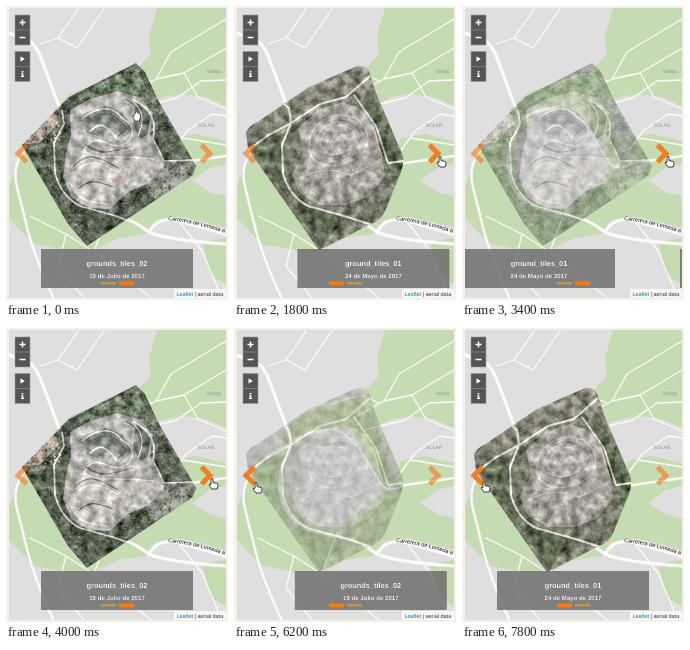
An HTML page for the animation above (8 s loop, 222 px wide and 294 px high).

```html
<!DOCTYPE html>
<html lang="es">
<head>
<meta charset="utf-8">
<title>Aerial map carousel</title>
<style>
html, body { margin: 0; width: 100%; height: 100%; overflow: hidden; background: #f4f2e8; }
svg { display: block; width: 100vw; height: 100vh; }
text { font-family: "Liberation Sans", Arial, sans-serif; text-rendering: geometricPrecision; }
.road { fill: none; stroke: #fbfbf9; stroke-linecap: round; stroke-linejoin: round; }
.place { font-size: 5px; fill: #969696; text-anchor: middle; }
.caption text { fill: #fff; font-weight: bold; text-anchor: middle; filter: drop-shadow(0 .5px .5px #0009); }
.caption rect { fill: #646464; fill-opacity: .78; }
.arrow { fill: none; stroke: #f47d20; stroke-width: 5; }
.button { fill: #555; stroke: #999; stroke-width: .6; }
.hand { fill: #fff; stroke: #111; stroke-width: .8; stroke-linejoin: round; }
</style>
</head>
<body>
<svg viewBox="0 0 222 294">
  <defs>
    <clipPath id="view"><rect x="3" y="2" width="217" height="290"/></clipPath>
    <clipPath id="julyEdge"><path d="M16 139 63 91 130 57 139 66 152 94 190 160 187 169 81 240 62 218Z"/></clipPath>
    <clipPath id="mayEdge"><path d="M12 127Q13 121 25 115L75 81 121 61Q132 57 136 68L142 87 166 143Q172 153 167 166L152 203Q148 214 137 218L85 244 77 233 14 143Z"/></clipPath>
    <path id="labelPath" d="M162 214Q192 217 225 229"/>
    <filter id="relief" x="0" y="0" width="1" height="1" color-interpolation-filters="sRGB">
      <feTurbulence type="fractalNoise" baseFrequency=".11" numOctaves="4" seed="5"/>
      <feColorMatrix values="1 0 0 0 0  1 0 0 0 0  1 0 0 0 0  0 0 0 0 1"/>
      <feComposite in="SourceGraphic" operator="arithmetic" k2="1" k3=".7" k4="-.35"/>
    </filter>
  </defs>
  <g clip-path="url(#view)">
    <rect width="222" height="294" fill="#dfdfdf"/>
    <g fill="#c5dbb2">
      <path d="M151 2H220V100L200 91 177 88 158 91 143 98 151 124 160 154 148 165 136 134 119 106 103 99 85 103 62 116 50 128 48 103 66 87 98 75 126 68 145 48 143 30Z"/>
      <path d="M3 180 14 150 28 129 57 116 50 148 55 176 73 195 105 202 143 168 160 160 166 133 190 128 220 135V158L203 162 186 175 205 187 220 190V222L176 211 150 214 139 228 112 232 88 244 60 244 28 238 3 212Z"/>
      <path d="M196 236 220 232V278L205 270Z"/>
    </g>
    <path d="M62 125 87 107 109 109 130 134 142 162 123 181 103 196 78 189 62 171 57 147Z" fill="#d9d9d9"/>
    <g class="road" stroke-width="1.3">
      <path d="M34 38 52 32 71 42 98 3M52 32 72 3"/>
      <path d="M120 90 150 73 178 67 220 42M150 73 165 46 220 13M130 102 171 92 195 75 220 74M178 67 192 91 220 103"/>
      <path d="M160 154 181 125 206 108 220 110M177 132 220 139M145 75 127 67 98 76"/>
      <path d="M24 210 60 228 95 251 145 292M60 228 52 260 78 292M103 204 89 243"/>
      <path d="M174 217 196 245 212 283"/>
    </g>
    <g class="road" stroke-width="2.4">
      <path d="M57 116Q30 126 17 146 6 162 11 181L20 217Q27 248 48 293"/>
      <path d="M57 116Q74 101 101 101 119 109 130 128L146 155Q154 166 171 157L220 150"/>
    </g>
    <path class="road" stroke-width="3.2" d="M3 27 25 36Q32 42 38 60L56 108Q58 118 51 132 43 148 47 169 52 191 75 202L110 210Q126 213 143 226 160 234 220 238"/>
    <path class="road" stroke-width="3.2" d="M143 226Q151 211 170 214L222 229"/>
    <text class="place" x="208" y="67">Vallejo</text>
    <text class="place" x="200" y="121">SOLAR</text>
    <text class="place" x="99" y="118">CAMPERA</text>

    <g id="july" clip-path="url(#julyEdge)">
      <g filter="url(#relief)">
        <path fill="#5a6354" d="M0 50H200V245H0Z"/>
        <path fill="#6f8066" d="M72 90 128 61 146 90 133 101 112 84 80 101Z"/>
        <path fill="#b3a596" d="M16 138 47 106 57 113 33 137Z"/>
        <path fill="#8d9084" d="M150 158 188 152 190 168 150 194 139 181Z"/>
        <g class="texture"></g>
        <path fill="#b4b2ae" d="M64 104 84 93 112 85 135 92 147 107 144 128 154 144 158 160 143 177 122 186 104 203 83 202 66 192 57 171 60 147 65 128Z"/>
        <path fill="#858a85" d="M78 107 101 100 115 106 128 122 119 131 106 121 91 130 80 126Z"/>
        <path fill="#6d7669" d="M130 96 145 108 142 128 134 133 127 118Z"/>
        <path fill="#c4beb7" d="M65 156 87 144 113 156 138 150 149 159 123 176 103 188 84 197 65 184Z"/>
        <g class="pit"></g>
        <g fill="none" stroke="#e0ded9" stroke-width="1.4">
          <path d="M75 114Q84 105 96 103T116 112Q130 120 125 131T106 139Q93 133 87 135T78 145Q88 152 100 151T148 153"/>
          <path d="M83 126Q92 117 98 120T111 133M67 167Q80 155 90 157T113 167M129 98Q141 109 132 130M63 175Q70 190 77 193T101 198"/>
        </g>
        <g fill="none" stroke="#666d67" stroke-width="1.1">
          <path d="M84 113Q97 106 105 109T121 123L112 130M80 139Q92 147 101 146T127 140M67 161Q78 149 88 151T112 162M119 93Q139 102 134 122M72 183Q82 174 91 176T107 181"/>
        </g>
        <path class="road" stroke-width="1.7" opacity=".75" d="M56 104 58 118 48 137 49 167Q55 190 74 200L110 210 140 222M128 94Q153 107 147 132L158 155 188 154"/>
      </g>
    </g>

    <g id="may" clip-path="url(#mayEdge)">
      <g filter="url(#relief)">
        <path fill="#77796a" d="M0 50H200V250H0Z"/>
        <path fill="#8d8b7d" d="M23 116 76 80 133 57 142 85 107 88 60 119 43 133Z"/>
        <path fill="#616b54" d="M18 139 55 126 48 155 56 184 80 201 113 209 87 242Z"/>
        <path fill="#626d56" d="M137 87 172 153 161 181 148 150 134 122Z"/>
        <g class="texture"></g>
        <path fill="#a6a29b" d="M64 122 84 104 108 96 130 104 141 122 148 150 151 169 136 190 112 199 86 199 66 188 58 168 69 148Z"/>
        <path fill="#b0aca6" d="M80 125 104 108 127 117 134 139 123 153 98 157 80 147Z"/>
        <g class="pit"></g>
        <g fill="none" stroke="#c8c5be" stroke-width="1.2">
          <path d="M75 145Q73 116 103 109 130 108 134 132 135 151 105 159 80 162 75 145ZM86 140Q88 120 107 119 123 122 121 135 113 149 96 149ZM99 137 109 128 115 134"/>
          <path d="M66 173Q87 158 117 169L146 155M137 114 148 151"/>
        </g>
        <path fill="none" stroke="#8a8c86" d="M80 132Q88 115 104 114T128 130Q122 148 99 151L84 147M94 137 101 126 113 127"/>
        <path class="road" stroke-width="2" opacity=".78" d="M13 145 33 130 57 117 55 102 38 88M57 117 86 98 112 91 136 70M57 117 48 139 49 167Q55 190 74 200L110 210 142 220M120 89 142 120 154 157 171 155"/>
      </g>
    </g>

    <text font-size="5.6" fill="#000" stroke="#fff" stroke-width="1.2" paint-order="stroke"><textPath href="#labelPath">Carretera de Lomeda a la</textPath></text>

    <g class="caption">
      <rect x="35" y="243" width="152" height="39"/>
      <text x="111" y="260" font-size="7.4">grounds_tiles_02</text>
      <text x="111" y="272" font-size="6.1">19 de Julio de 2017</text>
    </g>
    <g class="caption">
      <rect x="35" y="243" width="152" height="39"/>
      <text x="111" y="260" font-size="7.4">ground_tiles_01</text>
      <text x="111" y="272" font-size="6.1">24 de Mayo de 2017</text>
    </g>
    <rect class="dot" x="95" width="15"/>
    <rect class="dot" x="113" width="15"/>
    <path id="left" class="arrow" d="M20.5 139 12 147.500 20.500 156"/>
    <path id="right" class="arrow" d="M195.500 139 204 147.500 195.500 156"/>

    <path class="button" d="M9 9H24V39H9ZM9 24H24M9 45.500H24V75.500H9ZM9 60.500H24"/>
    <path fill="none" stroke="#fff" stroke-width="1.5" d="M13.500 16.500H19.500M16.500 13.500V19.500M13.500 31.500H19.500"/>
    <path fill="#fff" d="M14.500 50.500 19 53 14.500 55.500ZM15.700 65H17.400V66.500H15.700ZM15.200 67.300H17.400V70H18V71H15V70H15.700V68.200H15.200Z"/>

    <path fill="#fff" fill-opacity=".75" d="M168 283H220V292H168Z"/>
    <text x="170.500" y="290" font-size="5.5" fill="#333"><tspan fill="#0078a8">Leaflet</tspan> | aerial data</text>

    <g id="cursor" class="hand">
      <path id="pointer" d="M-3-4Q-2-5.500-1-4V-.5L3 .5Q4.500 1 4 3L3 6H-2L-5 2Q-4.500 .5-3 1.500Z"/>
      <path id="grab" transform="scale(.85)" d="M-3.500-3Q-2.500-4.500-1.800-3V-4.500Q-.8-6 .2-4.500V-4Q1.500-5 2.200-3.300V-2.500Q3.600-3 4 -1.500V2L2.800 6H-2L-4.800 2Q-5-.2-3.500 .5Z"/>
    </g>
  </g>
</svg>
<script>
const LOOP = 8000, STEP = 200, SLIDE_MS = 600, VIEW_WIDTH = 217;
const FADE_DELAY = 70, FADE_MS = 200;
const JULY = 0, MAY = 1;
const slides = [
  { start: 1352, to: MAY, dir: -1 },
  { start: 3234, to: JULY, dir: -1 },
  { start: 6055, to: MAY, dir: 1 },
];
// Pointer stops: time, x, y
const cursorStops = [
  [200, 131, 110], [1000, 208, 155], [4000, 208, 155], [4600, 158, 130],
  [5200, 83, 143], [5400, 47, 159], [5600, 24, 159], [7600, 24, 159], [7800, 24, 158],
];
const $ = id => document.getElementById(id);
const images = [$("july"), $("may")];
const captions = [...document.querySelectorAll(".caption")];
const dots = [...document.querySelectorAll(".dot")];
const clamp = v => Math.min(1, Math.max(0, v));

function easeInOut(p) {
  const a = p ** 1.75;
  return a / (a + (1 - p) ** 1.75);
}

let seed = 7;
function random() {
  seed = (seed * 16807) % 2147483647;
  return seed / 2147483647;
}

function speckle(group, color, count, size, [x, y, w, h], opacity) {
  let d = "";
  for (let i = 0; i < count; i++) {
    const r = (size * (0.5 + random())).toFixed(1);
    d += `M${(x + random() * w).toFixed(1)} ${(y + random() * h).toFixed(1)}h${r}v${r}h-${r}z`;
  }
  const path = document.createElementNS("http://www.w3.org/2000/svg", "path");
  path.setAttribute("d", d);
  path.setAttribute("fill", color);
  path.setAttribute("opacity", opacity);
  group.append(path);
}

const land = [10, 56, 182, 190], pit = [64, 94, 84, 102];
const [julyLand, mayLand] = images.map(g => g.querySelector(".texture"));
const [julyPit, mayPit] = images.map(g => g.querySelector(".pit"));
speckle(julyLand, "#303a2f", 2400, 1.5, land, 0.6);
speckle(julyLand, "#a3a899", 1900, 1.2, land, 0.6);
speckle(julyLand, "#e2d6ca", 60, 1.5, [20, 108, 34, 25], 0.8);
speckle(mayLand, "#47523f", 1800, 1.3, land, 0.4);
speckle(mayLand, "#9a9786", 1300, 1.2, land, 0.45);
for (const group of [julyPit, mayPit]) {
  speckle(group, "#d1cec7", 220, 1.3, pit, 0.35);
  speckle(group, "#777b76", 200, 1.2, pit, 0.3);
}

function cursorAt(t) {
  const next = cursorStops.findIndex(stop => stop[0] > t);
  if (next === 0) return cursorStops[0].slice(1);
  if (next < 0) return cursorStops.at(-1).slice(1);
  const [t0, x0, y0] = cursorStops[next - 1], [t1, x1, y1] = cursorStops[next];
  const p = (t - t0) / (t1 - t0);
  return [x0 + (x1 - x0) * p, y0 + (y1 - y0) * p];
}

function place(index, offset) {
  captions[index].setAttribute("transform", `translate(${offset.toFixed(1)} 0)`);
}

function render(t) {
  const slide = slides.findLast(s => s.start <= t);
  const active = slide ? slide.to : JULY;
  const age = slide ? t - slide.start : Infinity;
  const p = easeInOut(clamp(age / SLIDE_MS));
  const dir = slide ? slide.dir : -1;
  place(active, -dir * VIEW_WIDTH * (1 - p));
  place(1 - active, dir * VIEW_WIDTH * p);

  images[active].style.opacity = clamp((age - FADE_DELAY) / FADE_MS);
  images[1 - active].style.opacity = 0;

  dots.forEach((dot, i) => {
    const on = i === 1 - active;
    dot.setAttribute("y", on ? 275.5 : 276.2);
    dot.setAttribute("height", on ? 3.8 : 2.2);
    dot.setAttribute("fill", on ? "#ff7a00" : "#c39a4a");
  });

  const [x, y] = cursorAt(t);
  const overLeft = x < 35, overRight = x > 187;
  const rightFocused = t >= slides[0].start && t < slides[2].start;
  const leftFocused = t >= slides[2].start;
  $("cursor").setAttribute("transform", `translate(${x.toFixed(1)} ${y.toFixed(1)})`);
  $("pointer").style.display = overLeft || overRight ? "" : "none";
  $("grab").style.display = overLeft || overRight ? "none" : "";
  $("left").style.opacity = overLeft || leftFocused ? 1 : 0.65;
  $("right").style.opacity = overRight || rightFocused ? 1 : 0.65;
}

const origin = performance.now();
function tick() {
  const t = (performance.now() - origin) % LOOP;
  render(Math.floor(t / STEP) * STEP);
  requestAnimationFrame(tick);
}
tick();
</script>
</body>
</html>
```
